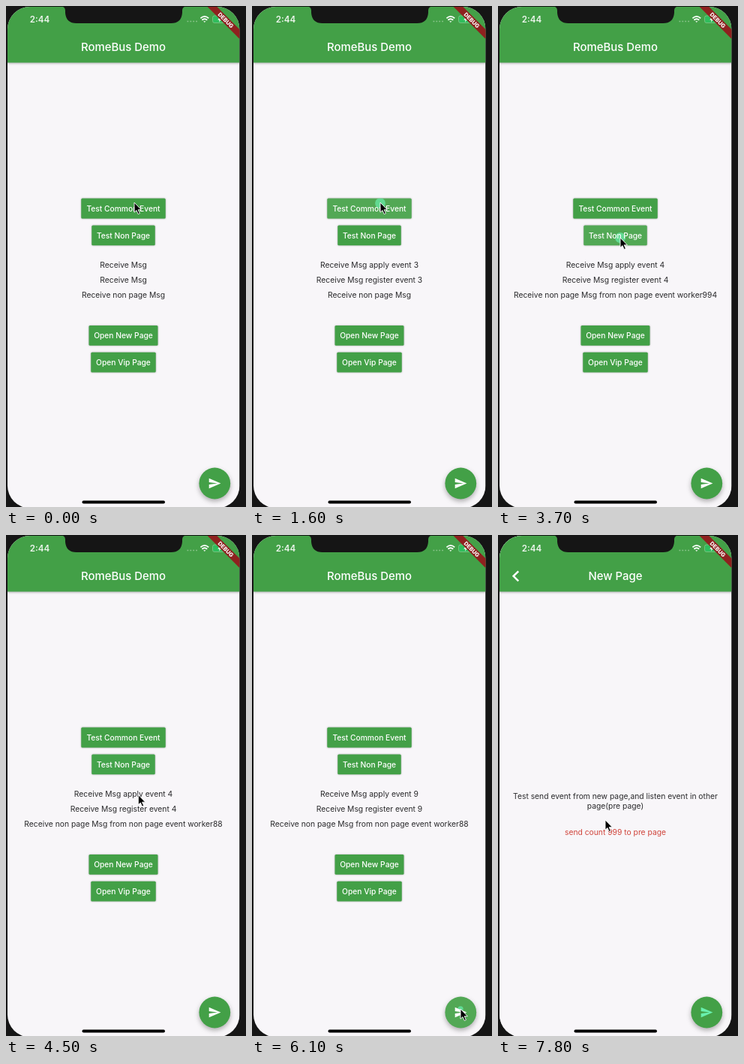
An HTML page that plays this animation: 320x668 px, repeating every 8 s.

```html
<!DOCTYPE html>
<html lang="en">
<head>
<meta charset="utf-8">
<title>Event bus demo</title>
<style>
  html, body { margin: 0; width: 100%; height: 100%; overflow: hidden; background: #151515; }
  svg { display: block; width: 320px; height: 668px; }
  text { font: 400 10.3px Inter, Roboto, sans-serif; fill: #2a2a2c; text-anchor: middle; }
  .label { font-size: 10.25px; font-weight: 500; fill: #fff; }
  .title { font-size: 14.9px; font-weight: 500; fill: #fff; }
  .clock { font-size: 11.6px; font-weight: 600; fill: #edf6ed; }
  .debug { font-size: 7.4px; font-weight: 800; fill: #fff; }
  .red { fill: #d0453c; }
  .bar, .btn, .fab { fill: #43a047; }
  .bar { filter: drop-shadow(0 1.5px 1.5px rgba(0,0,0,.3)); }
  .btn { filter: drop-shadow(0 .8px .8px rgba(0,0,0,.3)); }
  .fab { filter: drop-shadow(0 3px 3px rgba(0,0,0,.3)); }
  .press { fill: #fff; }
  .ripple { fill: #69f0ae; }
</style>
</head>
<body>
<svg id="stage" viewBox="0 0 320 668"></svg>
<script>
const LOOP = 8000, LAG = 50, CX = 156.5;

// Each tap: time, target, and the resulting worker number where there is one
const taps = [
  [420, 'common'], [940, 'common'], [1500, 'common'], [1900, 'common'],
  [2590, 'non', 536], [3100, 'non', 271], [3600, 'non', 994], [4120, 'non', 88],
  [5020, 'fab'], [5340, 'fab'], [5560, 'fab'], [5800, 'fab'], [6040, 'fab'],
  [6780, 'open']
];
const touch = { common: [171, 263], non: [163, 309], fab: [278, 632], open: [157, 438] };
const pointer = [
  [0, 171, 262], [2080, 171, 262], [2420, 163, 309], [4380, 163, 309], [4950, 278, 632],
  [6200, 278, 632], [6680, 157, 438], [7200, 157, 438], [7650, 143, 380], [8000, 143, 380]
];
const slide = { start: 6860, length: 400 };

const text = (x, y, body, cls = '', id = '') =>
  `<text x="${x}" y="${y}" class="${cls}" id="${id}">${body}</text>`;
const ink = id => `<g clip-path="url(#clip-${id})">
  <rect class="press" id="press-${id}" width="320" height="668" opacity="0"/>
  <circle class="ripple" id="ripple-${id}" cx="${touch[id][0]}" cy="${touch[id][1]}" opacity="0"/></g>`;

function button(id, y, w, body) {
  const box = `x="${CX - w / 2}" y="${y}" width="${w}" height="26.8" rx="1.5"`;
  return `<clipPath id="clip-${id}"><rect ${box}/></clipPath><rect class="btn" ${box}/>`
    + (touch[id] ? ink(id) : '') + text(CX, y + 17, body, 'label');
}
const page = (id, title, body) => `<g id="${id}">
  <rect x="2" width="309.5" height="668" fill="#f8f6f9"/>
  <rect class="bar" x="2" width="309.5" height="75.5"/>
  ${text(CX, 60, title, 'title')}${body}</g>`;

document.getElementById('stage').innerHTML = `
<clipPath id="screen"><rect x="2" y="1" width="309.5" height="668.5" rx="30"/></clipPath>
<clipPath id="clip-fab"><circle cx="278.3" cy="636.5" r="20.9"/></clipPath>
<g clip-path="url(#screen)">
  ${page('home', 'RomeBus Demo',
    button('common', 256.6, 112.5, 'Test Common Event')
    + button('non', 292.5, 84.5, 'Test Non Page')
    + text(CX, 348.7, '', '', 'apply') + text(CX, 368.7, '', '', 'register')
    + text(CX, 388.7, '', '', 'worker')
    + button('open', 426, 92, 'Open New Page')
    + button('vip', 461.8, 86.5, 'Open Vip Page'))}
  ${page('next', 'New Page',
    '<path d="M27.2 48.3l-6.6 6.5 6.6 6.5" fill="none" stroke="#fff" stroke-width="2.5"/>'
    + text(CX, 352.3, 'Test send event from new page,and listen event in other')
    + text(CX, 365, 'page(pre page)')
    + text(CX, 400, 'send count 999 to pre page', 'red'))}
  <circle class="fab" cx="278.3" cy="636.5" r="20.9"/>${ink('fab')}
  <path id="send" transform="translate(269.2 627.6) scale(.746)" d="M2 21 23 12 2 3v7l15 2-15 2z"/>
  ${text(45, 22, '2:44', 'clock')}
  <path d="M241.5 20.5h14" stroke="#b9dcba" stroke-opacity=".6" stroke-width="1.6" stroke-dasharray="1.8 2.1"/>
  <g fill="none" stroke="#fff" stroke-width="1.8">
    <path d="M259.4 16.3q5.4-4.8 10.8 0M261.4 18.7q3.4-2.9 6.8 0"/>
    <path d="M263.2 20.2h3.2l-1.6 1.9z" fill="#fff" stroke="none"/>
  </g>
  <rect x="275.5" y="13" width="17" height="9.5" rx="2.5" fill="#30bd5c" stroke="#8ccb90" stroke-width=".7"/>
  <path d="M285.5 14l-3.2 4.4h2.3l-.6 3.4 3.4-4.6h-2.4z" fill="#fff"/>
  <g transform="translate(293 19) rotate(45)">
    <rect x="-30" y="-4.5" width="60" height="9" fill="#8e211f"/>
    ${text(0, 2.7, 'DEBUG', 'debug')}
  </g>
  <rect x="101.5" y="659.6" width="110.5" height="3.8" rx="1.9" fill="#000"/>
</g>
<path fill="#151515" d="M73 0Q79 1 79 6V9Q80 23 94 23H220Q234 23 235 9V6Q235 1 241 0z"/>
<path id="pointer" d="M0 0V13.2L3 10.5 5.2 15.5 7.4 14.5 5.2 9.7H9.4z" fill="#000" stroke="#fff" stroke-width=".9"/>`;

const el = id => document.getElementById(id);
const clamp = v => Math.max(0, Math.min(1, v));
const move = (id, x, y = 0) => el(id).setAttribute('transform', `translate(${x} ${y})`);
function say(id, body) {
  if (el(id).textContent !== body) el(id).textContent = body;
}

function drawInk(id, t) {
  const last = taps.filter(tap => tap[1] === id && tap[0] <= t).pop();
  const age = last ? t - last[0] : 1e4;
  const grow = age < 100 ? age * .06 : 6 + (age - 100) * .9;
  const fade = age < 100 ? .7 : age < 450 ? .7 * Math.exp((100 - age) / 90) : 0;
  el('ripple-' + id).setAttribute('r', grow);
  el('ripple-' + id).setAttribute('opacity', fade);
  el('press-' + id).setAttribute('opacity', .08 * clamp(2 - age / 100));
}

function drawPointer(t) {
  const i = pointer.findIndex(k => k[0] > t);
  const [t0, x0, y0] = pointer[i - 1], [t1, x1, y1] = pointer[i];
  const p = (t - t0) / (t1 - t0), e = p * p * (3 - 2 * p);
  move('pointer', x0 + (x1 - x0) * e, y0 + (y1 - y0) * e);
}

function draw(t) {
  const done = taps.filter(tap => tap[0] + LAG <= t);
  const count = done.filter(tap => tap[1] === 'common' || tap[1] === 'fab').length;
  const job = done.filter(tap => tap[1] === 'non').pop();
  say('apply', 'Receive Msg' + (count ? ' apply event ' + count : ''));
  say('register', 'Receive Msg' + (count ? ' register event ' + count : ''));
  say('worker', 'Receive non page Msg' + (job ? ' from non page event worker' + job[2] : ''));
  Object.keys(touch).forEach(id => drawInk(id, t));
  const e = 1 - (1 - clamp((t - slide.start) / slide.length)) ** 4;
  move('home', -103 * e);
  move('next', 312 * (1 - e));
  el('send').setAttribute('fill', e > 0 ? '#69f0ae' : '#fff');
  drawPointer(t);
}

const start = performance.now();
function tick() {
  draw((performance.now() - start) % LOOP);
  requestAnimationFrame(tick);
}
tick();
</script>
</body>
</html>
```
